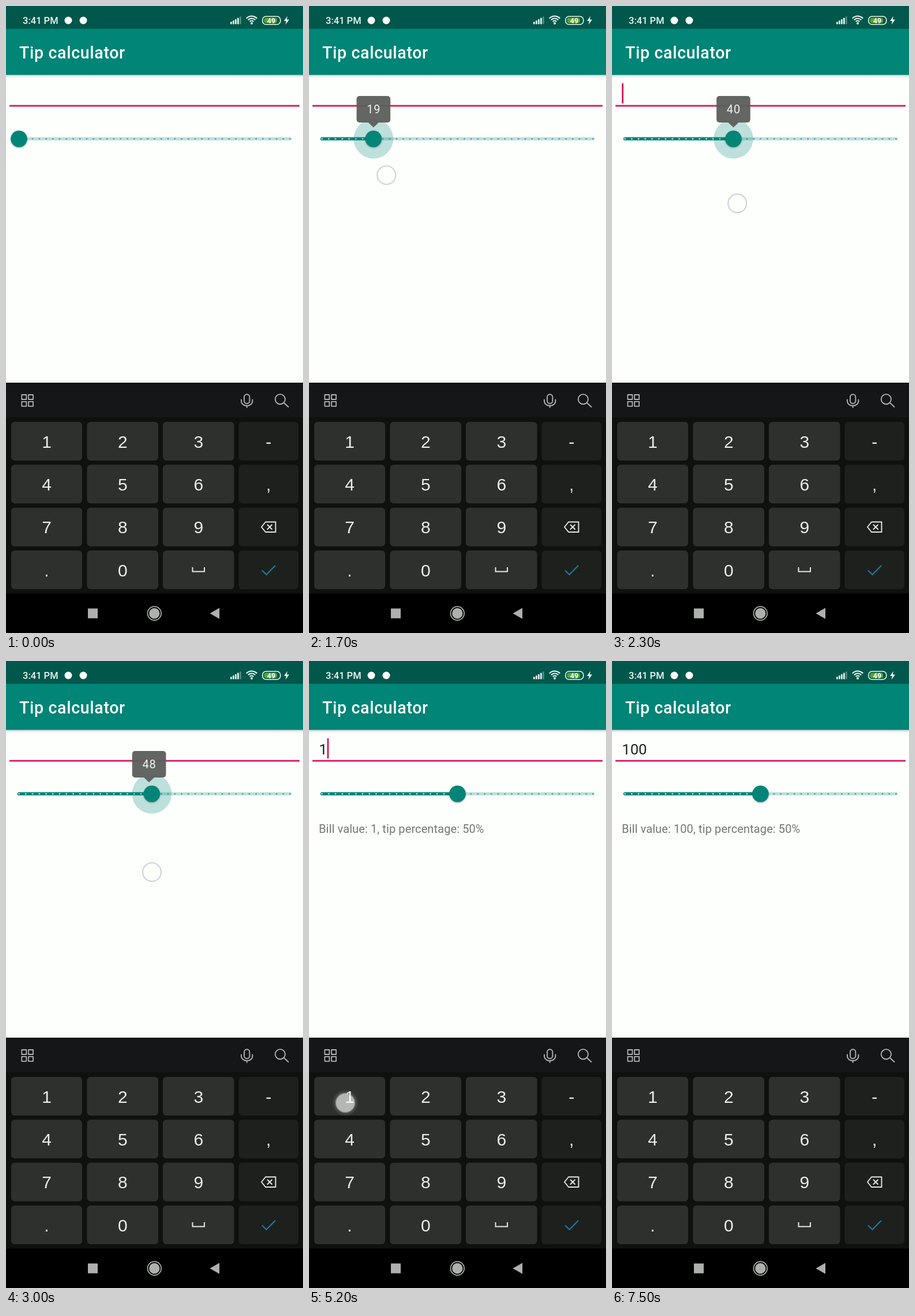
These frames come from a looping animation (515 by 1087 pixels, 8 s). An HTML page with a canvas:

```html
<!DOCTYPE html>
<html lang="en">
<head>
<meta charset="utf-8">
<title>Tip calculator</title>
<style>
html, body { margin: 0; width: 100%; height: 100%; overflow: hidden; background: #000; }
canvas { display: block; width: 515px; height: 1087px; }
</style>
</head>
<body>
<canvas id="stage" width="515" height="1087"></canvas>
<script>
const ctx = document.getElementById('stage').getContext('2d');
const LOOP = 8000, STEP = 100;
const TEAL = '#008577', PINK = '#d81b60', PAPER = '#fdfffd';
const ROBOTO = 'Roboto, sans-serif', KEY_FONT = '30px "Liberation Sans", Arial, sans-serif';
const TRACK = { x: 22.5, y: 230.3, w: 470, ticks: 40 };
const DRAG = { from: 1100, to: 3800, fadeAt: 3600, fade: 500 };

// time, x, y of the dragging finger
const PATH = [[1100, 52, 247], [1300, 59, 251], [2000, 191, 326], [3000, 253, 366], [3700, 258, 373]];
const TAPS = [
  { at: 5000, typed: 5200, x: 63, y: 766, fade: 260, text: '1' },
  { at: 6000, typed: 6100, x: 199, y: 984, fade: 260, text: '10' },
  { at: 6900, typed: 7000, x: 199, y: 975, fade: 200, text: '100' }
];

const clamp = v => Math.max(0, Math.min(1, v));

function rect(x, y, w, h, fill) {
  ctx.fillStyle = fill;
  ctx.fillRect(x, y, w, h);
}

function round(x, y, w, h, r, fill) {
  ctx.beginPath();
  ctx.roundRect(x, y, w, h, r);
  ctx.fillStyle = fill;
  ctx.fill();
}

function dot(x, y, r, fill) {
  ctx.beginPath();
  ctx.arc(x, y, r, 0, Math.PI * 2);
  ctx.fillStyle = fill;
  ctx.fill();
}

function line(d, color, width) {
  ctx.strokeStyle = color;
  ctx.lineWidth = width;
  ctx.stroke(new Path2D(d));
}

function shape(d, fill) {
  ctx.fillStyle = fill;
  ctx.fill(new Path2D(d));
}

function text(str, x, y, font, fill, spacing = 0, align = 'left') {
  ctx.font = font;
  ctx.letterSpacing = spacing + 'px';
  ctx.textAlign = align;
  ctx.fillStyle = fill;
  ctx.fillText(str, x, y);
}

// Monotone cubic through the path points
function pathAt(t, axis) {
  const last = PATH.length - 1;
  if (t <= PATH[0][0]) return PATH[0][axis];
  if (t >= PATH[last][0]) return PATH[last][axis];
  const slope = i => (PATH[i + 1][axis] - PATH[i][axis]) / (PATH[i + 1][0] - PATH[i][0]);
  const tangent = i => {
    if (i === 0) return slope(0);
    if (i === last) return 0;
    const a = slope(i - 1), b = slope(i);
    return 2 * a * b / (a + b);
  };
  const i = PATH.findIndex(p => p[0] > t) - 1;
  const [a, b] = [PATH[i], PATH[i + 1]];
  const h = b[0] - a[0], u = (t - a[0]) / h, v = 1 - u;
  return a[axis] * (1 + 2 * u) * v * v + b[axis] * u * u * (3 - 2 * u)
    + h * u * v * (tangent(i) * v - tangent(i + 1) * u);
}

const valueX = v => TRACK.x + v * TRACK.w / 100;
const fingerValue = t => Math.round((pathAt(t, 1) - TRACK.x) / TRACK.w * 100);

function statusBar() {
  rect(0, 0, 515, 40, '#00574b');
  text('3:41 PM', 29, 31, '500 16.5px ' + ROBOTO, '#eef6f3');
  dot(108, 25, 6.5, '#fff');
  dot(134, 25, 6.5, '#fff');
  for (let i = 0; i < 5; i++) {
    const h = 4 + i * 2.3;
    rect(389 + i * 4, 31.5 - h, 2.8, h, i < 4 ? '#e4efec' : '#4f8b82');
  }
  for (const r of [4.5, 8.5, 12.5]) {
    ctx.beginPath();
    ctx.arc(426, 30, r, -Math.PI * 0.76, -Math.PI * 0.24);
    ctx.strokeStyle = '#eef6f3';
    ctx.lineWidth = 2.2;
    ctx.stroke();
  }
  dot(426, 30, 2, '#eef6f3');
  ctx.beginPath();
  ctx.roundRect(444.8, 18, 31, 14, 6);
  ctx.strokeStyle = '#eef6f3';
  ctx.lineWidth = 1.6;
  ctx.stroke();
  round(447.5, 20.5, 22.5, 9, 3.5, '#54a82c');
  text('49', 460, 29.5, '700 12.5px ' + ROBOTO, '#fff', 0, 'center');
  shape('M488 17.5L482 26H486L484.500 32.500L491 23.500H486.800Z', '#eef6f3');
}

function appBar() {
  const g = ctx.createLinearGradient(0, 119, 0, 125);
  g.addColorStop(0, 'rgba(0,0,0,.16)');
  g.addColorStop(1, 'rgba(0,0,0,0)');
  rect(0, 119, 515, 6, g);
  rect(0, 39.5, 515, 80, TEAL);
  text('Tip calculator', 23, 91, '500 28.6px ' + ROBOTO, '#fff', 0.64);
}

function slider(value, label, pressed) {
  const { x, y, w, ticks } = TRACK, tx = valueX(value);
  round(x - 2.8, y - 2.8, w + 5.6, 5.6, 2.8, 'rgba(0,133,119,.25)');
  if (value > 0) round(x - 2.8, y - 2.8, tx - x + 2.8, 5.6, [2.8, 0, 0, 2.8], TEAL);
  for (let i = 0; i <= ticks; i++) {
    const px = x + i * w / ticks;
    dot(px, y, 1.4, px <= tx ? '#bfe3dc' : 'rgba(0,133,119,.62)');
  }
  if (pressed) dot(tx, y, 34.3, 'rgba(0,133,119,.25)');
  ctx.save();
  ctx.shadowColor = 'rgba(0,0,0,.35)';
  ctx.shadowBlur = 3;
  ctx.shadowOffsetY = 1.2;
  dot(tx, y, 14.3, TEAL);
  ctx.restore();
  if (pressed) tooltip(valueX(label), String(label));
}

function tooltip(x, str) {
  const half = 17.7 + str.length * 5.8, color = 'rgba(92,94,92,.95)';
  const box = new Path2D();
  box.roundRect(x - half, 156, half * 2, 46, 5);
  box.addPath(new Path2D(`M${x - 9} 202h18l-9 8.500z`));
  ctx.fillStyle = color;
  ctx.fill(box);
  text(str, x + 0.4, 185.5, '20px ' + ROBOTO, '#f2f4f2', 0.8, 'center');
}

function keyboard() {
  rect(0, 653, 515, 366, '#0f110f');
  rect(0, 653, 515, 60, '#141617');
  rect(0, 1018.5, 515, 69, '#000');

  ctx.lineJoin = 'round';
  ctx.lineCap = 'round';
  const tool = '#b2b4b2';
  for (const x of [27.3, 39]) for (const y of [674, 685.8]) {
    line(`M${x} ${y}h8v8h-8z`, tool, 1.8);
  }
  line('M413 678a4.700 4.700 0 0 1 9.400 0v6.500a4.700 4.700 0 0 1-9.400 0z', tool, 1.9);
  line('M408 682.500v2.500a9.700 8 0 0 0 19.400 0v-2.500M417.700 693v3', tool, 1.9);
  line('M466.800 681.700a8.600 8.600 0 1 1 17.200 0a8.600 8.600 0 1 1-17.200 0M481.700 687.800L489.500 695', tool, 1.9);

  const cols = [[9, 123], [140.5, 123.5], [272, 123.5], [403.5, 103.5]];
  ['123-', '456,', '789<', '.0_>'].forEach((row, r) => {
    const y = 721 + r * 74.35;
    [...row].forEach((ch, c) => {
      const [x, w] = cols[c];
      round(x, y, w, 67, 6, c < 3 ? '#2e302e' : '#1e201e');
      if (!'<_>'.includes(ch)) text(ch, x + w / 2, y + 44.7, KEY_FONT, '#eceeec', 0, 'center');
    });
  });
  line('M450 894.500H467.500V912H450L443 903.250Z', '#e6e8e6', 1.9);
  line('M453.500 899.500l7.500 7.500m0-7.500l-7.500 7.500', '#e6e8e6', 1.9);
  ctx.lineJoin = 'miter';
  ctx.lineCap = 'butt';
  line('M323.500 973v7.500h20.500v-7.500', '#e6e8e6', 2);
  line('M444 978.500l7.500 7.200l15.500-15.700', '#1b7a9f', 2.2);

  const nav = '#aeb0ae';
  rect(142, 1044.5, 17, 17, nav);
  dot(257.3, 1053, 9.2, nav);
  line('M245.500 1053a11.800 11.800 0 1 1 23.600 0a11.800 11.800 0 1 1-23.600 0', nav, 1.7);
  shape('M353.500 1053L370 1043.500V1062.500Z', nav);
}

function finger(x, y, alpha) {
  if (alpha <= 0) return;
  ctx.save();
  ctx.globalAlpha = alpha;
  const glow = ctx.createRadialGradient(x, y, 14, x, y, 23);
  glow.addColorStop(0, 'rgba(255,255,255,.4)');
  glow.addColorStop(1, 'rgba(255,255,255,0)');
  dot(x, y, 23, glow);
  dot(x, y, 15.5, 'rgba(253,255,253,.87)');
  ctx.beginPath();
  ctx.arc(x, y, 16, 0, Math.PI * 2);
  ctx.strokeStyle = 'rgba(196,206,208,.85)';
  ctx.lineWidth = 2.2;
  ctx.stroke();
  ctx.restore();
}

function billField(t) {
  const tap = TAPS.findLast(k => t >= k.typed);
  const str = tap ? tap.text : '';
  rect(6, 171.6, 503, 2.9, PINK);
  text(str, 17.2, 161.5, '25.7px ' + ROBOTO, '#212321');
  const since = t - (tap ? tap.typed : 100);
  if (since >= 0 && since % 1000 < 500) {
    ctx.font = '25.7px ' + ROBOTO;
    rect(17 + ctx.measureText(str).width, 134, 2.9, 35, PINK);
  }
  if (str) {
    text(`Bill value: ${str}, tip percentage: 50%`, 17, 297.5, '20px ' + ROBOTO, '#747674', 0.1);
  }
}

function draw(t) {
  const pressed = t >= DRAG.from && t < DRAG.to;
  const value = t < DRAG.from ? 0 : fingerValue(t - 100);
  const label = t > 2500 ? fingerValue(t - 200) : value;
  rect(0, 0, 515, 1087, PAPER);
  statusBar();
  appBar();
  billField(t);
  slider(value, label, pressed);
  keyboard();
  if (t >= DRAG.from) {
    finger(pathAt(t, 1), pathAt(t, 2), clamp(1 - (t - DRAG.fadeAt) / DRAG.fade));
  }
  for (const k of TAPS) {
    if (t >= k.at) finger(k.x, k.y, clamp(1 - (t - k.at - 100) / k.fade));
  }
}

const start = performance.now();
function tick() {
  const t = (performance.now() - start) % LOOP;
  draw(Math.floor(t / STEP) * STEP);
  requestAnimationFrame(tick);
}
tick();
</script>
</body>
</html>
```
